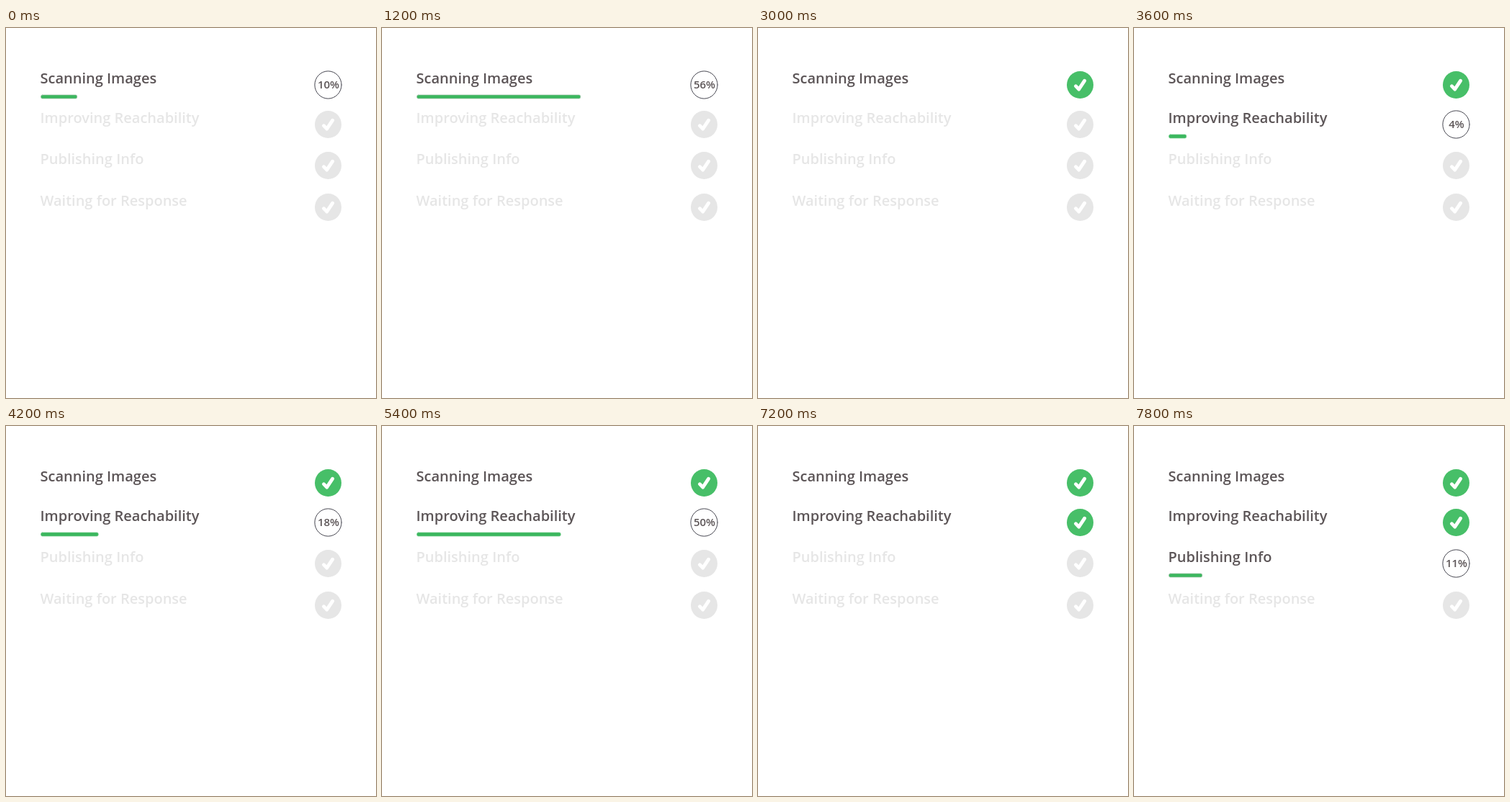
An HTML page with a canvas that plays this animation: 514x514 px, repeating every 8000 ms.

```html
<!DOCTYPE html>
<html lang="en">
<head>
<meta charset="utf-8">
<title>Progress checklist</title>
<style>
  html, body { margin: 0; width: 100%; height: 100%; overflow: hidden; background: #fff; }
  canvas { display: block; width: 514px; height: 514px; }
</style>
</head>
<body>
<canvas id="stage" width="514" height="514"></canvas>
<script>
const ctx = document.getElementById('stage').getContext('2d');
const LOOP = 8000, STEP = 600;
const DARK = '#5c5557', PALE = '#e6e6e6', GREEN = '#47bf68', BAR = '#3bb75e';
const FONT = '"Open Sans", sans-serif';
const BADGE_X = 447.5, BAR_X = 48.5;

const rows = [
  { label: 'Scanning Images', y: 79, edge: '#9dbfa5' },
  { label: 'Improving Reachability', y: 134, edge: '#6fca88' },
  { label: 'Publishing Info', y: 191, edge: '#9dbfa5' },
  { label: 'Waiting for Response', y: 249, edge: '#9dbfa5' }
];

// One entry per step: active row, then percent and bar end while it is running.
const steps = [
  [0, 10, 99], [0, 28, 168], [0, 56, 276], [0, 73, 342], [0, 97, 412], [0],
  [1, 4, 73], [1, 18, 128.5], [1, 34, 188], [1, 50, 248.5], [1, 78, 346], [1, 97, 412.5], [1],
  [2, 11, 95]
];

function drawText(text, x, y, size, color, align) {
  ctx.font = `600 ${size}px ${FONT}`;
  ctx.textAlign = align;
  ctx.fillStyle = color;
  ctx.fillText(text, x, y);
}

function badgePath(y, rx, ry) {
  ctx.beginPath();
  ctx.ellipse(BADGE_X, y, rx, ry, 0, 0, Math.PI * 2);
}

function drawCheck(y, color) {
  badgePath(y, 18.5, 19);
  ctx.fillStyle = color;
  ctx.fill();
  ctx.beginPath();
  ctx.moveTo(441.4, y + 1.7);
  ctx.lineTo(445.7, y + 6.2);
  ctx.lineTo(453.7, y - 5.8);
  ctx.strokeStyle = '#fff';
  ctx.lineWidth = 4.8;
  ctx.lineCap = ctx.lineJoin = 'round';
  ctx.stroke();
}

function drawProgress(row, percent, end) {
  ctx.beginPath();
  ctx.roundRect(BAR_X, row.y + 14, end - BAR_X - 0.3, 5, 2);
  ctx.fillStyle = BAR;
  ctx.fill();
  ctx.strokeStyle = row.edge;
  ctx.lineWidth = 0.7;
  ctx.stroke();

  badgePath(row.y, 18.6, 19.1);
  ctx.strokeStyle = '#45454f';
  ctx.lineWidth = 1;
  ctx.stroke();
  drawText(percent + '%', 448, row.y + 5, 15, DARK, 'center');
}

function render(time) {
  const [active, percent, end] = steps[Math.floor((time % LOOP) / STEP)];
  ctx.fillStyle = '#fff';
  ctx.fillRect(0, 0, 514, 514);
  rows.forEach((row, i) => {
    drawText(row.label, 47.5, row.y - 2, 20, i <= active ? DARK : PALE, 'left');
    if (i === active && percent) drawProgress(row, percent, end);
    else drawCheck(row.y, i <= active ? GREEN : PALE);
  });
}

const start = performance.now();
function tick() {
  render(performance.now() - start);
  requestAnimationFrame(tick);
}
tick();
</script>
</body>
</html>
```
